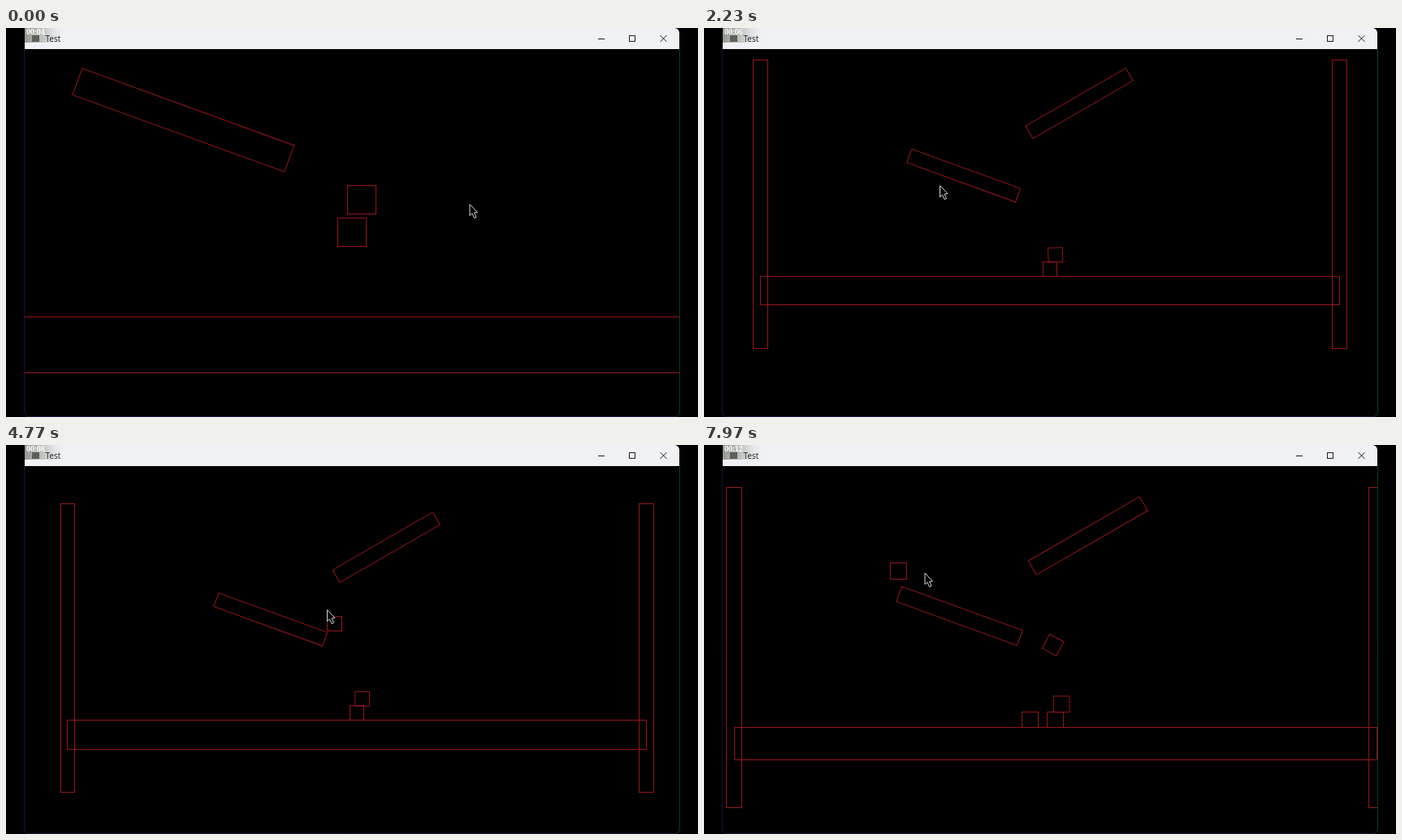
An HTML page with a canvas that plays this animation: 852x480 px, repeating every 8 s.

```html
<!DOCTYPE html>
<html lang="en">
<head>
<meta charset="utf-8">
<title>Test</title>
<style>
html, body { margin: 0; width: 100%; height: 100%; overflow: hidden; background: #000; }
canvas { display: block; width: 852px; height: 480px; }
</style>
</head>
<body>
<canvas id="stage" width="852" height="480"></canvas>
<script>
const ctx = document.getElementById('stage').getContext('2d');
const LOOP = 8;
const LINE = '#94161a';
const RAMP_HIT = 6.53;

// Mouse stops: time, x, y
const STOPS = [
  [0, 571, 217], [1.37, 232.5, 214], [2.23, 290.5, 194], [3.03, 371.5, 191],
  [3.53, 407, 220], [4.2, 407, 220], [4.77, 395.5, 203], [5.85, 390, 202],
  [6.17, 331.5, 195], [7.65, 240, 152], [7.97, 272, 157.5]
];

const clamp = v => Math.min(1, Math.max(0, v));
const ease = (t, from, to) => {
  const u = clamp((t - from) / (to - from));
  return u * u * (3 - 2 * u);
};

function mouseAt(t) {
  let [, x, y] = STOPS[0];
  for (let i = 1; i < STOPS.length; i++) {
    const [from, x0, y0] = STOPS[i - 1], [to, x1, y1] = STOPS[i];
    const u = ease(t, from, to);
    x += (x1 - x0) * u;
    y += (y1 - y0) * u;
  }
  return [x, y];
}

function fall(t, start, y, g, floor) {
  const d = Math.max(0, t - start);
  return Math.min(floor, y + g * d * d / 2);
}

// Seven wheel notches out, two drags, one notch back in
function viewAt(t) {
  const notches = Math.min(7, Math.floor(t / 0.26));
  const s = 34.7 / Math.pow(1.1, notches) / (t >= 5.4 ? 0.9 : 1);
  const drag1 = ease(t, 2.5, 2.8), drag2 = ease(t, 4.3, 4.47);
  const cx = -0.74 * drag1 + 0.4 * drag2;
  const cy = -3.953 - 0.79 * drag1 - 1.077 * drag2;
  return { s, x: 426 - cx * s, y: 253.6 - cy * s };
}

function body(view, x, y, w, h, deg = 0) {
  const { s } = view;
  const px = view.x + x * s, py = view.y + y * s;
  const hw = w * s / 2, hh = h * s / 2;
  ctx.strokeStyle = LINE;
  ctx.lineWidth = 1;
  if (deg) {
    ctx.save();
    ctx.translate(px + 0.5, py + 0.5);
    ctx.rotate(deg * Math.PI / 180);
    ctx.strokeRect(-hw, -hh, 2 * hw, 2 * hh);
    ctx.restore();
  } else {
    const l = Math.floor(px - hw), r = Math.floor(px + hw);
    const top = Math.floor(py - hh), bottom = Math.floor(py + hh);
    ctx.strokeRect(l + 0.5, top + 0.5, r - l, bottom - top);
  }
  ctx.fillStyle = '#38080a';
  ctx.fillRect(Math.floor(px), Math.floor(py), 1, 1);
}

function scene(t) {
  const view = viewAt(t);
  const box = (x, y, deg) => body(view, x, y, 1, 1, deg);
  ctx.save();
  ctx.beginPath();
  ctx.rect(23, 26, 806, 453);
  ctx.clip();

  body(view, 0, 0, 40, 2);
  for (const x of [-20, 20]) body(view, x, -6, 1, 20);
  body(view, -6, -8, 8, 1, 20);
  body(view, 2, -13, 8, 1, -30);

  box(0, fall(t, 0, -4, 1.215, -1.5));
  const wobble = -2.5 * Math.sin(clamp((t - 2.09) / 0.4) * Math.PI);
  box(0.345, fall(t, 0, -5.15, 1.215, -2.5), wobble);

  if (t >= 4.5) box(-1.565, fall(t, 4.5, -7.77, 2.45, -1.5));
  if (t >= 5.85) {
    // Lands on the ramp, then tips over its end
    const u = clamp((t - RAMP_HIT) / 1.44), slide = Math.pow(u, 1.6);
    const y = fall(t, 5.85, -8.38, 2.45, -7.81);
    box(-2.15 + 1.97 * slide, y + 1.62 * slide, 28 * (1 - Math.pow(1 - u, 3)));
  }
  if (t >= 7.65) box(-9.76, fall(t, 7.65, -10.91, 2.45, -9.9));
  ctx.restore();
}

function line(color, ...pts) {
  ctx.strokeStyle = color;
  ctx.lineWidth = 1;
  ctx.beginPath();
  for (let i = 0; i < pts.length; i += 2) ctx.lineTo(pts[i], pts[i + 1]);
  ctx.stroke();
}

function frameEdge() {
  line('#16163a', 22.5, 26, 22.5, 475, 25.5, 479.5, 826, 479.5);
  line('#123c1c', 826, 479.5, 829.5, 475, 829.5, 26);
}

function titleBar(t) {
  ctx.fillStyle = '#f0f1f5';
  ctx.beginPath();
  ctx.roundRect(23, 0, 806, 26, [0, 6, 0, 0]);
  ctx.fill();

  const shade = ctx.createLinearGradient(23, 0, 72, 0);
  shade.addColorStop(0, 'rgba(115,120,110,.75)');
  shade.addColorStop(0.45, 'rgba(145,150,140,.5)');
  shade.addColorStop(1, 'rgba(200,205,200,0)');
  ctx.fillStyle = shade;
  ctx.fillRect(23, 0, 49, 18);
  ctx.fillStyle = '#5c6058';
  ctx.fillRect(32, 9, 9, 8);

  ctx.fillStyle = '#fff';
  ctx.font = 'bold 9px "Noto Serif", serif';
  const sec = Math.floor(4.1 + t);
  ctx.fillText('00:' + String(sec).padStart(2, '0'), 25, 8);

  const ink = '#202024';
  ctx.fillStyle = ink;
  ctx.font = '10px "Open Sans", "Noto Sans", sans-serif';
  ctx.fillText('Test', 48.5, 17);
  line(ink, 729, 13.5, 737, 13.5);
  ctx.strokeRect(767.5, 9.5, 7, 7);
  line(ink, 805.5, 9, 813.5, 17);
  line(ink, 813.5, 9, 805.5, 17);
}

function cursor(t) {
  const [x, y] = mouseAt(t);
  ctx.save();
  ctx.translate(x, y);
  ctx.fillStyle = '#000';
  const arrow = new Path2D('M0 .5V14.5L3 11.8 5.5 17.5 8 16.5 5.6 11 9.5 10.5Z');
  ctx.fill(arrow);
  ctx.strokeStyle = '#d4d4e0';
  ctx.lineWidth = 1;
  ctx.stroke(arrow);
  ctx.restore();
}

function draw(now) {
  const t = (now / 1000) % LOOP;
  ctx.fillStyle = '#000';
  ctx.fillRect(0, 0, 852, 480);
  scene(t);
  frameEdge();
  titleBar(t);
  cursor(t);
  requestAnimationFrame(draw);
}
requestAnimationFrame(draw);
</script>
</body>
</html>
```
